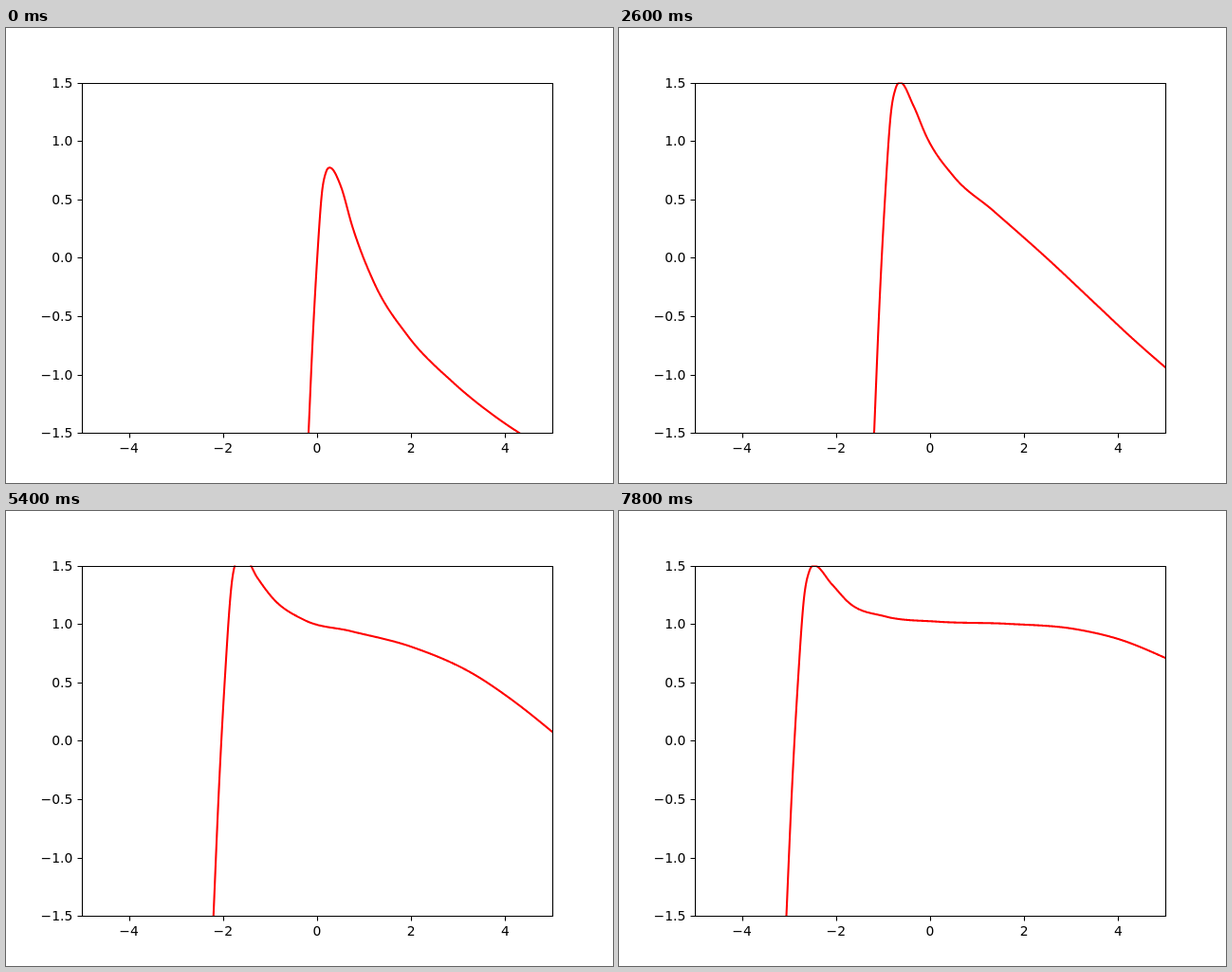
These frames come from a looping animation (640x480 px, 8000 ms). An HTML page:

```html
<!DOCTYPE html>
<html lang="en">
<head>
<meta charset="utf-8">
<style>
  html, body { margin: 0; width: 100%; height: 100%; overflow: hidden; background: #fff; }
  svg { display: block; }
  text { font: 13.89px "DejaVu Sans", sans-serif; }
  .axes { fill: none; stroke: #000; stroke-width: 1.11; }
  .curve { fill: none; stroke: #f00; stroke-width: 2.08; stroke-linejoin: round; }
</style>
</head>
<body>
<svg width="640" height="480" viewBox="0 0 640 480">
  <clipPath id="plot"><rect x="80" y="57.6" width="496" height="369.6"/></clipPath>
  <path class="curve" clip-path="url(#plot)"/>
  <path class="axes"/>
  <g class="labels"></g>
</svg>
<script>
const STEP = 200, STEPS = 40, BOTTOM = 427.2, RIGHT = 576;

// Rising flank in units of peak size; falling side as fractions of the way to the right edge.
const FLANK = [[-.2, -.38], [0, 0], [.2, .36], [.41, .66], [.64, .91], [.82, .982]];
const FALL = [.05, .1, .2, .35, .55, .75, .87, 1];

// step, foot x, peak x, peak y, then heights at the FALL positions
const KEYS = [
  [0, 319, 341.3, 147.3, 167, 208, 269, 324.5, 373, 411, 430, 449],
  [8, 288, 313.5, 80.3, 104.5, 140, 190.5, 238.5, 293, 345.5, 372.5, 398],
  [13, 269, 296.5, 57.4, 82, 115, 156, 192.5, 242, 294.5, 326, 358],
  [19, 247, 275.5, 45, 68.5, 97, 127.5, 152.5, 187.5, 235.5, 267, 304],
  [23, 233, 262.5, 43, 68, 93.5, 120, 137, 162, 200.5, 231.3, 267.5],
  [31, 204.5, 234, 47, 73, 92, 111.5, 120.3, 131, 151.3, 172, 202],
  [39, 176.5, 205.7, 57.4, 77, 97, 111, 116.7, 119, 125, 135.5, 155]
];

// Cubic Hermite curve through points, with parabolic slopes; flat marks a summit.
function spline(points, flat = -1) {
  const last = points.length - 1;
  const gap = i => points[i + 1][0] - points[i][0];
  const rise = i => (points[i + 1][1] - points[i][1]) / gap(i);
  const inner = i => (rise(i - 1) * gap(i) + rise(i) * gap(i - 1)) / (gap(i) + gap(i - 1));
  const slopes = points.map((_, i) =>
    i === flat ? 0 :
    i === 0 ? 2 * rise(0) - inner(1) === 0 ? 0 : (3 * rise(0) - inner(1)) / 2 :
    i === last ? (3 * rise(last - 1) - inner(last - 1)) / 2 : inner(i));
  return x => {
    let i = 0;
    while (i < last - 1 && x > points[i + 1][0]) i++;
    const h = gap(i), u = (x - points[i][0]) / h, v = 1 - u;
    return points[i][1] * (1 + 2 * u) * v * v + points[i + 1][1] * (3 - 2 * u) * u * u
      + h * u * v * (slopes[i] * v - slopes[i + 1] * u);
  };
}

const tracks = KEYS[0].slice(1).map((_, j) => spline(KEYS.map(key => [key[0], key[j + 1]])));

function curvePath(step) {
  const [foot, peakX, peakY, ...heights] = tracks.map(track => track(step));
  const knots = [
    ...FLANK.map(([u, h]) => [foot + u * (peakX - foot), BOTTOM + h * (peakY - BOTTOM)]),
    [peakX, peakY],
    ...FALL.map((w, i) => [peakX + w * (RIGHT - peakX), heights[i]])
  ];
  const y = spline(knots, FLANK.length);
  const points = [];
  for (let x = knots[0][0]; x <= RIGHT + 1; x += .5) points.push(x.toFixed(2) + "," + y(x).toFixed(2));
  return "M" + points.join("L");
}

function drawAxes() {
  const labels = document.querySelector(".labels");
  const snap = v => Math.floor(v + .5) + .5;
  let d = "M80.5 58.5H576.5V427.5H80.5Z";
  const label = (value, x, y, anchor) => {
    const text = document.createElementNS("http://www.w3.org/2000/svg", "text");
    text.setAttribute("x", x);
    text.setAttribute("y", y);
    text.setAttribute("text-anchor", anchor);
    text.textContent = value.replace("-", "\u2212");
    labels.append(text);
  };
  for (let v = -4; v <= 4; v += 2) {
    const x = 328 + 49.6 * v;
    d += `M${snap(x)} 427.5v5`;
    label(String(v), x, 448, "middle");
  }
  for (let v = -1.5; v <= 1.5; v += .5) {
    const y = 242.4 - 123.2 * v;
    d += `M80.5 ${snap(y)}h-5`;
    label(v.toFixed(1), 70.3, Math.round(y + 5), "end");
  }
  document.querySelector(".axes").setAttribute("d", d);
}

const curve = document.querySelector(".curve");
let shown = -1;
function render(now) {
  const step = Math.floor(now / STEP) % STEPS;
  if (step !== shown) curve.setAttribute("d", curvePath(shown = step));
  requestAnimationFrame(() => render(performance.now() - start));
}

drawAxes();
const start = performance.now();
render(0);
</script>
</body>
</html>
```
